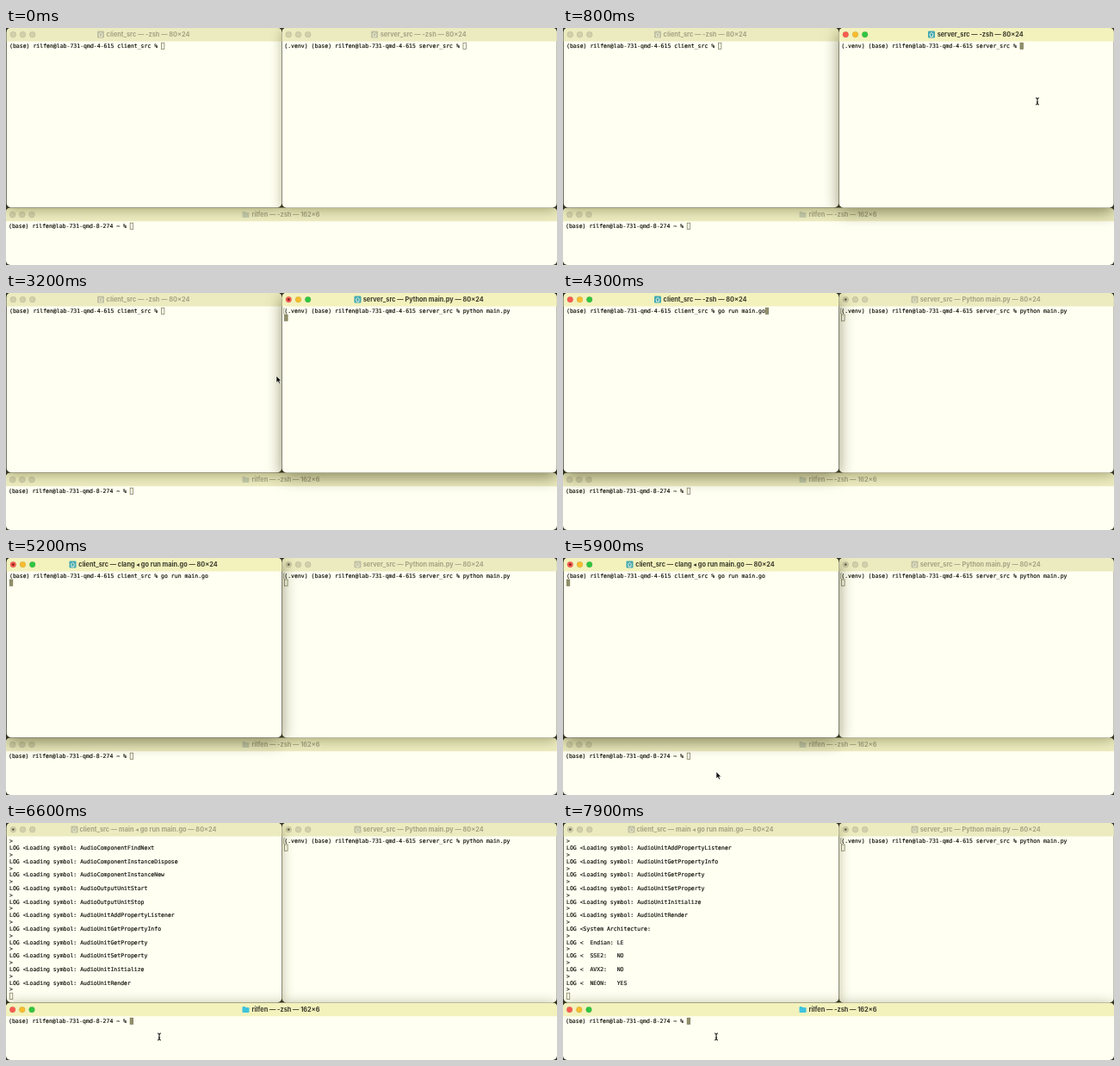
Recreate the animation shown at these times as an HTML page. Size 640x275 px, loop 8 s.

```html
<!DOCTYPE html>
<html lang="en">
<head>
<meta charset="utf-8">
<title>Terminals</title>
<style>
html, body { margin: 0; width: 100%; height: 100%; overflow: hidden; background: #34342c; }
svg { display: block; width: 640px; height: 275px; }
.term { font: 6.5px "DejaVu Sans Mono", monospace; fill: #0c0c06; stroke: #0c0c06; stroke-width: .15px; white-space: pre; }
.title { font: 700 7.35px Inter, "DejaVu Sans", sans-serif; fill: #a5a384; text-anchor: middle; }
.active .title { fill: #3b3a2c; }
.win { filter: drop-shadow(0 3px 7px rgba(70,70,10,.4)); }
.win.active { filter: drop-shadow(0 5px 9px rgba(50,50,5,.55)); }
</style>
</head>
<body>
<svg viewBox="0 0 640 275">
  <g id="windows"></g>
  <g id="mouse"></g>
</svg>
<script>
const LOOP = 8000;
const COL = 3.913, ROW = 7.826;
const USER = 'rilfen', HOST = 'lab-731-qmd-';
const CLICK_SERVER = 600, RUN_SERVER = 2100;
const CLICK_CLIENT = 3500, RUN_CLIENT = 4700;
const CLICK_SHELL = 6300, LOG_START = 6300, LOG_MORE = 7200;

const symbols = ['ComponentFindNext', 'ComponentInstanceDispose', 'ComponentInstanceNew',
  'OutputUnitStart', 'OutputUnitStop', 'UnitAddPropertyListener', 'UnitGetPropertyInfo',
  'UnitGetProperty', 'UnitSetProperty', 'UnitInitialize', 'UnitRender'];
const log = [
  ...symbols.map(s => 'Loading symbol: Audio' + s),
  'System Architecture:', '  Endian: LE', '  SSE2:   NO', '  AVX2:   NO', '  NEON:   YES'
];

const frames = {
  client: { x: 0.7, y: 0, w: 319.5, h: 208.3, textX: 4, titleX: 165 },
  server: { x: 320.7, y: 0, w: 319, h: 208.5, textX: 323.3, titleX: 484.7 },
  shell: { x: 0, y: 208.8, w: 640, h: 66.2, textX: 3, titleX: 325 }
};

const windowsEl = document.getElementById('windows');
const mouseEl = document.getElementById('mouse');
const escapeText = s => s.replace(/</g, '&lt;').replace(/>/g, '&gt;');
const clamp01 = v => Math.max(0, Math.min(1, v));
const ease = v => v * v * (3 - 2 * v);
const prompt = (host, dir) => `(base) ${USER}@${HOST}${host} ${dir} % `;
const typed = (text, t, from, to) =>
  text.slice(0, Math.floor(clamp01((t - from) / (to - from)) * text.length));

function clientState(t) {
  const command = prompt('4-615', 'client_src') + typed('go run main.go', t, 3700, 4250);
  if (t < RUN_CLIENT) return { title: 'client_src — -zsh — 80×24', iconX: 110, lines: [command] };
  if (t < LOG_START) {
    return { title: 'client_src — clang ◂ go run main.go — 80×24', iconX: 77.5, lines: [command, ''], busy: true };
  }
  const first = t < LOG_MORE ? 0 : 5;
  const lines = ['>'];
  log.slice(first, first + 11).forEach(entry => lines.push('LOG <' + entry, '>'));
  return { title: 'client_src — main ◂ go run main.go — 80×24', iconX: 79.5, lines: [...lines, ''], busy: true };
}

function serverState(t) {
  const command = '(.venv) ' + prompt('4-615', 'server_src') + typed('python main.py', t, 1050, 1950);
  return t < RUN_SERVER
    ? { title: 'server_src — -zsh — 80×24', iconX: 428, lines: [command] }
    : { title: 'server_src — Python main.py — 80×24', iconX: 408.5, lines: [command, ''], busy: true, mark: true };
}

function shellState() {
  return { title: USER + ' — -zsh — 162×6', iconX: 278.5, lines: [prompt('8-274', '~')], folder: true };
}

function icon(x, y, active, folder) {
  const fade = active ? 1 : 0.5;
  if (folder) {
    return `<path transform="translate(${x - 4} ${y - 3.5})" opacity="${fade}" fill="${active ? '#3fc3dd' : '#9aa898'}"
      d="M0 1Q0 0 1 0H3L4 1H7.2Q8 1 8 2V6Q8 7 7 7H1Q0 7 0 6Z"/>`;
  }
  return `<g transform="translate(${x - 4} ${y - 4})" opacity="${fade}">
    <rect width="8" height="8" rx="1" fill="${active ? '#43a9b2' : '#96968a'}"/>
    <path d="M1.5 4L4 1.8L6.5 4M2.5 4V6.5H5.5V4" fill="none" stroke="#f4f4e4" stroke-width=".9"/></g>`;
}

function lights(x, y, active, busy) {
  const colors = active ? ['#fb5b50', '#f9bd2e', '#2fc640'] : Array(3).fill('#d2d0ac');
  const dots = colors.map((c, i) =>
    `<circle cx="${x + i * 11.2}" cy="${y}" r="3.4" fill="${c}" stroke="#77744a" stroke-opacity=".35" stroke-width=".5"/>`);
  if (busy) dots.push(`<circle cx="${x}" cy="${y}" r="1.4" fill="${active ? '#7c2018' : '#66644c'}"/>`);
  return dots.join('');
}

function drawWindow(name, state, active) {
  const { x, y, w, h, textX, titleX } = frames[name];
  const barY = Math.round(y) + 7.6;
  const top = Math.round(y) + 17;
  const last = state.lines.length - 1;
  const text = state.lines.map((line, i) =>
    `<text class="term" x="${textX}" y="${(top + 6.2 + i * ROW).toFixed(2)}">${escapeText(line)}</text>`).join('');
  const cursorX = textX + state.lines[last].length * COL;
  const cursorY = top + last * ROW;
  const cursor = `<rect x="${cursorX + 0.3}" y="${cursorY + 0.2}" width="3.5" height="7.2"
    fill="${active ? '#92916b' : 'none'}" stroke="#75744f" stroke-width=".7"/>`;
  const mark = state.mark
    ? `<path d="M${textX + 0.6} ${top + 0.8}h-1.3v6.2h1.3" fill="none" stroke="#77765c" stroke-width=".6"/>` : '';
  return `<g class="win${active ? ' active' : ''}">
    <rect x="${x}" y="${y}" width="${w}" height="${h}" rx="5" fill="#fffff2"/>
    <path d="M${x} ${y + 15.5}V${y + 5}q0 -5 5 -5H${x + w - 5}q5 0 5 5V${y + 15.5}Z" fill="${active ? '#f3f2bd' : '#ecebc0'}"/>
    ${lights(x + 7.6, barY, active, state.busy)}
    ${icon(state.iconX, barY, active, state.folder)}
    <text class="title" x="${titleX}" y="${barY + 2.7}">${state.title}</text>
    ${text}${cursor}${mark}</g>`;
}

function glide(t, from, to, a, b) {
  const p = ease(clamp01((t - from) / (to - from)));
  return [a[0] + (b[0] - a[0]) * p, a[1] + (b[1] - a[1]) * p];
}

function drawMouse(t) {
  const onServer = [551, 85], onClient = [232, 100], onShell = [178, 248];
  let pos, beam;
  if (t >= 200 && t < 1050) {
    pos = glide(t, 200, 580, [480, 220], onServer);
    beam = t >= CLICK_SERVER;
  } else if (t >= 2800 && t < 3700) {
    pos = glide(t, 2800, 3400, onServer, onClient);
    beam = t >= CLICK_CLIENT || pos[0] > 321;
  } else if (t >= 5400) {
    pos = glide(t, 5400, 5850, onClient, onShell);
    beam = t >= CLICK_SHELL || pos[1] < 208;
  } else return '';
  const shape = beam
    ? `<path d="M-2 -4Q0 -4 0 -2.5Q0 -4 2 -4M0 -3V3M-2 4Q0 4 0 2.5Q0 4 2 4M-1 1H1"
        fill="none" stroke="#11110a" stroke-width="1"/>`
    : `<path d="M0 0V8L1.9 6.3L3.2 9L4.7 8.3L3.4 5.8H5.8Z" fill="#11110a" stroke="#fff" stroke-width=".6"/>`;
  return `<g transform="translate(${pos[0].toFixed(2)} ${pos[1].toFixed(2)})">${shape}</g>`;
}

function stacking(t) {
  if (t < CLICK_CLIENT) return ['shell', 'client', 'server'];
  if (t < CLICK_SHELL) return ['shell', 'server', 'client'];
  return ['server', 'client', 'shell'];
}

let shown = '';
function render(t) {
  const states = { client: clientState(t), server: serverState(t), shell: shellState() };
  const order = stacking(t);
  const focused = t >= CLICK_SERVER ? order[2] : null;
  const markup = order.map(name => drawWindow(name, states[name], name === focused)).join('');
  if (markup !== shown) windowsEl.innerHTML = shown = markup;
  mouseEl.innerHTML = drawMouse(t);
}

const start = performance.now();
function tick() {
  render((performance.now() - start) % LOOP);
  requestAnimationFrame(tick);
}
tick();
</script>
</body>
</html>
```
